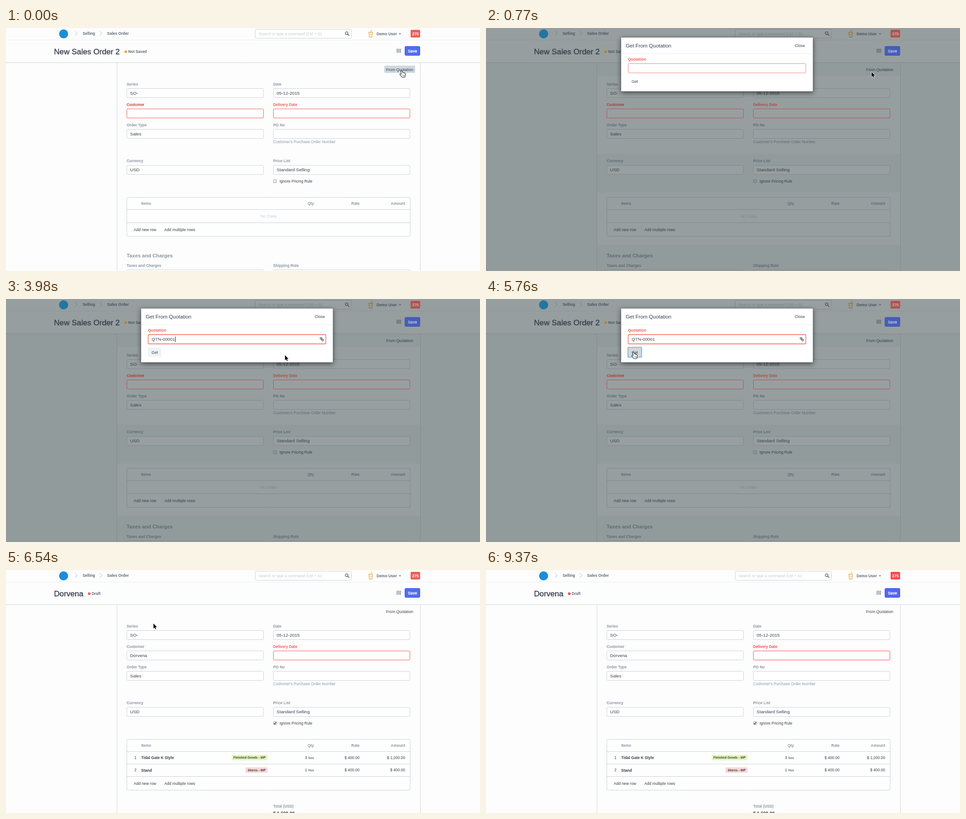
These frames come from a looping animation (1045 by 536 pixels, 9.51 s). An HTML page with a canvas:

```html
<!DOCTYPE html>
<html lang="en">
<head>
<meta charset="utf-8">
<title>Sales order from quotation</title>
<style>
html, body { margin: 0; width: 100%; height: 100%; overflow: hidden; background: #fdfdfd; }
canvas { display: block; width: 1045px; height: 536px; }
</style>
</head>
<body>
<canvas id="stage"></canvas>
<script>
const W = 1045, H = 536, LOOP = 9510;
const canvas = document.getElementById('stage');
const dpr = window.devicePixelRatio || 1;
canvas.width = W * dpr;
canvas.height = H * dpr;
const g = canvas.getContext('2d');

const FONT = '"Liberation Sans", Arial, sans-serif';
const INK = '#36414c', GREY = '#8a97a3', LINE = '#cbd3d8', SHADE = '#334143';
const CLIENT = 'Dorvena', ITEM = 'Tidal Gate K Style', QUOTE = 'QTN-00001';

const spread = (a, b, n) => Array.from({ length: n }, (_, i) => a + (b - a) * i / (n - 1));
const ticks = [0, 300, 460, 620, 770, 1020, 1160, 1310, 1460, 1750, 1900, 2040, 2340, 2490,
  ...spread(2790, 3380, 5), 3830, 3980, ...spread(4430, 5460, 8),
  5610, 5760, 5910, 6060, 6540, ...spread(7590, 8630, 8), 8780, 8920, 9370];

// Pointer path: time, x, y, shape
const path = [
  [0, 872, 95, 'hand'], [300, 872, 95, 'hand'], [460, 873, 98, 'hand'], [620, 873, 98, 'hand'],
  [770, 850, 97, 'arrow'], [1310, 630, 84, 'arrow'], [1460, 627, 88, 'beam'],
  [2640, 627, 88, 'arrow'], [3380, 615, 124, 'arrow'], [4290, 615, 124, 'arrow'],
  [5460, 325, 118, 'hand'], [5910, 325, 118, 'arrow'], [7440, 325, 118, 'arrow'],
  [8630, 1012, 521, 'arrow'], [8780, 1014, 523, 'arrow'], [8920, 0, 0, '']
];

const lerp = (a, b, k) => a + (b - a) * k;
const smooth = k => k * k * (3 - 2 * k);
const within = (t, a, b) => t >= a && t < b;

function text(s, x, yc, size = 8.5, color = INK, weight = '', align = 'left') {
  g.font = `${weight === 'bold' ? 'bold ' : ''}${size}px ${FONT}`;
  g.textAlign = align;
  g.fillStyle = color;
  const y = yc + size * 0.36;
  g.fillText(s, x, y);
  if (weight === 'medium') {
    g.strokeStyle = color;
    g.lineWidth = 0.4;
    g.strokeText(s, x, y);
  }
}
const bold = (s, x, yc, color = GREY, size = 8.4, align) => text(s, x, yc, size, color, 'bold', align);

function box(x, y, w, h, r, fill, stroke, lw = 1) {
  g.beginPath();
  g.roundRect(x, y, w, h, r);
  if (fill) { g.fillStyle = fill; g.fill(); }
  if (stroke) { g.strokeStyle = stroke; g.lineWidth = lw; g.stroke(); }
}

function line(points, color, lw = 1) {
  g.beginPath();
  points.forEach(([x, y], i) => i ? g.lineTo(x, y) : g.moveTo(x, y));
  g.strokeStyle = color;
  g.lineWidth = lw;
  g.stroke();
}

function disc(x, y, r, fill, stroke, lw = 1) {
  g.beginPath();
  g.arc(x, y, r, 0, 7);
  if (fill) { g.fillStyle = fill; g.fill(); }
  if (stroke) { g.strokeStyle = stroke; g.lineWidth = lw; g.stroke(); }
}

function field(label, x, y, value = '') {
  bold(label, x, y - 9.5);
  box(x + 0.5, y + 0.5, 301, 20, 2, '#fff', LINE);
  text(value, x + 7.5, y + 10, 9.95);
}

function needed(label, x, y, red) {
  bold(label, x, y - 9.5, red);
  box(x + 0.5, y + 0.5, 301, 20, 2, null, red);
}

// Coloured parts, which stay vivid under the backdrop
function accents(s) {
  const red = s.vivid ? '#fb4b50' : '#ee5f59';
  disc(127, 13, 10, '#1a8fd6');
  box(892, 4, 21, 17, 2, red);
  bold('275', 902.7, 12.8, '#fff', 8.5, 'center');
  box(879.5, 40.5, 33, 20, 2, s.vivid ? '#5365f6' : '#506df3', '#4559d8');
  text('Save', 896, 50.4, 8.8, '#fff', 'medium', 'center');
  if (s.filled) disc(183.5, 52.2, 3, red);
  else {
    disc(264, 52.2, 3, '#f5a638');
    needed('Customer', 266, 178, red);
  }
  needed('Delivery Date', 589, 178, red);
}

function navbar() {
  for (const x of [152, 206.5]) line([[x, 7], [x + 5, 12], [x, 17]], '#b4bcc2');
  bold('Selling', 169, 12, '#5f6b76', 8.4);
  bold('Sales Order', 223, 12, '#5f6b76', 8.5);
  box(549.5, 2.5, 212, 20, 2, '#fff', LINE);
  text('Search or type a command (Ctrl + G)', 557, 12.7, 8.5, '#c3cad0');
  disc(751, 11.3, 3, null, '#4b5560', 1.2);
  line([[753.2, 13.5], [756.8, 17]], '#4b5560', 1.6);
  const orange = '#efae45';
  line([[800, 10], [801.2, 20], [806.8, 20], [808, 10]], orange, 1.3);
  line([[799, 9.5], [809, 9.5]], orange, 1.6);
  line([[804, 9], [805.5, 5], [807.5, 4.5]], orange, 1.1);
  line([[800.8, 14], [807.2, 14]], orange);
  bold('Demo User', 817, 12.8, '#5f6b76', 8.5);
  g.beginPath();
  g.moveTo(866, 11.8); g.lineTo(871, 11.8); g.lineTo(868.5, 14.6);
  g.fillStyle = '#5f6b76';
  g.fill();
  line([[0, 26.5], [W, 26.5]], '#eaeef1');
}

function table(s) {
  const bottom = s.filled ? 485.5 : 459.5;
  box(266.5, 373.5, 624.5, bottom - 373.5, 2, '#fefefe', LINE);
  const rules = s.filled ? [400.5, 428, 455.5] : [400.5, 429.5];
  for (const y of rules) line([[266, y], [891, y]], LINE);
  bold('Items', 298, 386.7);
  [['Qty', 679], ['Rate', 779.5], ['Amount', 880]].forEach(([n, x]) => bold(n, x, 386.7, GREY, 8.4, 'right'));
  if (s.filled) {
    row(1, 413.7, ITEM, 'Finished Goods - WP', 498, '#e4f6b6', 3, '$ 1,200.00');
    row(2, 441.2, 'Stand', 'Stores - WP', 528, '#f8d7d4', 1, '$ 400.00');
  } else {
    text('No Data', 578.5, 414.5, 9.9, '#c9d0d5', '', 'center');
  }
  const y = bottom - 14.7;
  if (s.ghost) {
    box(277, y - 7.5, 59, 15, 2, '#eaeef6');
    box(346, y - 7.5, 76, 15, 2, '#eaeef6');
  }
  text('Add new row', 281.5, y, 8.6);
  text('Add multiple rows', 349, y, 8.65);
}

function row(n, y, name, store, x, tint, qty, sum) {
  text(n, 283, y, 8.5);
  bold(name, 298, y + 0.3, INK, 8.5);
  box(x, y - 6, 578 - x - 1.5, 12, 1.5, tint);
  bold(store, 572.5, y, INK, 7.1, 'right');
  text(qty, 659, y, 8.5);
  text('Nos', 679, y + 0.3, 7.2, INK, '', 'right');
  text('$ 400.00', 779.5, y, 8.5, INK, '', 'right');
  text(sum, 880, y, 8.5, INK, '', 'right');
}

function page(s) {
  g.fillStyle = '#fdfdfd';
  g.fillRect(0, 0, W, H);
  if (s.dim) {
    g.fillStyle = '#f4f7f8';
    g.fillRect(0, 77, 244, 459);
    g.fillRect(914, 77, 131, 459);
    for (const [y, h] of [[77, 29], [277, 86], [478, 58]]) g.fillRect(245, y, 668, h);
  }
  navbar();
  text(s.filled ? CLIENT : 'New Sales Order 2', 105.7, 52, 17.2, INK, 'medium');
  bold(s.filled ? 'Draft' : 'Not Saved', s.filled ? 189 : 269.5, 52.3, '#5f6b76', 8.4);
  g.fillStyle = '#85919c';
  for (let i = 0; i < 9; i++) g.fillRect(861 + i % 3 * 3.6, 46 + Math.floor(i / 3) * 3, 2.7, 2.1);
  line([[0, 76.5], [W, 76.5]], '#cfd5d9');
  for (const x of [244.5, 913.5]) line([[x, 77], [x, H]], '#cfd6da');

  if (s.hover) box(834, 83, 68, 16, 2, '#ced8df');
  text('From Quotation', 838, 91.5, 8.6);
  field('Series', 266, 133, 'SO-');
  field('Date', 589, 133, '05-12-2015');
  field('Customer', 266, 178, s.filled ? CLIENT : '');
  field('', 589, 178);
  field('Order Type', 266, 223, 'Sales');
  field('PO No', 589, 223);
  text("Customer's Purchase Order Number", 589, 251.3, 8.5, GREY);
  field('Currency', 266, 302.5, 'USD');
  field('Price List', 589, 302.5, 'Standard Selling');
  box(589.5, 334.5, 7, 7, 1.5, '#e6e8e9', '#a9afb3');
  if (s.filled) line([[591, 338], [592.7, 340], [595.5, 335.5]], '#30363c', 1.3);
  text('Ignore Pricing Rule', 603, 338, 8.5);
  table(s);
  if (s.filled) {
    bold('Total (USD)', 589, 521.3);
    bold('$ 1,600.00', 589, 537, INK, 10);
  } else {
    bold('Taxes and Charges', 266, 502.3, GREY, 11.2);
    field('Taxes and Charges', 266, 533);
    field('Shipping Rule', 589, 533);
  }
  accents(s);
}

function modal(s) {
  g.save();
  g.globalAlpha = s.alpha;
  g.translate(0, s.lift);
  g.shadowColor = 'rgba(0,0,0,.55)';
  g.shadowBlur = 11 * dpr;
  g.shadowOffsetY = 3 * dpr;
  box(297.5, 20.5, 423.5, 119.5, 1, '#fff');
  g.shadowColor = 'transparent';
  box(297.5, 20.5, 423.5, 119.5, 1, null, 'rgba(50,60,65,.55)');
  text('Get From Quotation', 308, 39.3, 11.4, INK);
  text('Close', 703, 39.3, 8.7, INK, '', 'right');
  line([[298, 56.5], [721, 56.5]], '#eaeef1');
  bold('Quotation', 313, 69, '#f2604f', 8.5);
  box(313.5, 78.5, 391.5, 20.5, 2, '#fff', s.focus ? '#f15f4e' : '#f2857a', s.focus ? 1.3 : 1);
  if (s.value) text(s.value, 321, 88.8, 9.9);
  if (s.caret) {
    const x = s.value ? 373.5 : 321.5;
    line([[x, 83], [x, 95]], '#222');
  }
  if (s.linked) {
    disc(694.4, 86.5, 2, null, INK, 1.1);
    disc(698, 90.2, 2, null, INK, 1.1);
    line([[695, 87.2], [697.4, 89.6]], INK, 1.1);
  }
  if (s.pressed) box(313, 106.5, 30, 22, 2, '#d2dae0', '#83bdec', 2.2);
  else if (s.value) box(313, 107, 29.5, 20.5, 2, '#eff3f6');
  text('Get', 321, 117.7, 8.7);
  if (s.list) dropdown();
  g.restore();
}

function dropdown() {
  g.shadowColor = 'rgba(0,0,0,.2)';
  g.shadowBlur = 8 * dpr;
  g.shadowOffsetY = 4 * dpr;
  box(313.5, 100, 391.5, 143, 2, '#fff');
  g.shadowColor = 'transparent';
  box(313.5, 100, 391.5, 143, 2, null, LINE);
  g.fillStyle = '#f0f4f7';
  g.fillRect(314, 101, 390.5, 28);
  [QUOTE, 'QTN-00002', 'QTN-00003', '+ Create a new Quotation', 'Advanced Search']
    .forEach((s, i) => text(s, 321, 115 + i * 28.4, 8.6));
}

function outline(points, fill, stroke, lw) {
  g.beginPath();
  points.forEach(([x, y]) => g.lineTo(x, y));
  g.closePath();
  g.lineJoin = 'round';
  g.strokeStyle = stroke;
  g.lineWidth = lw;
  g.stroke();
  g.fillStyle = fill;
  g.fill();
  g.lineJoin = 'miter';
}

const shapes = {
  arrow() {
    outline([[0, 0], [0, 11], [2.5, 8.7], [4.2, 12.6], [6, 11.8], [4.4, 8], [7.8, 8]], '#0a0a0a', '#fff', 1.5);
  },
  hand() {
    outline([[-1, 0.3], [0.2, -0.3], [1.4, 0.8], [2.2, 4], [3.6, 3.6], [4.6, 4.4], [6, 4.2], [6.7, 5.2],
      [7.8, 5.3], [8.3, 7], [7.6, 10], [7.2, 13], [1.4, 13.4], [-0.6, 10.6], [-3.4, 7.4], [-2.4, 6.2],
      [0.2, 7.8]], '#fff', '#111', 1.9);
    for (const x of [2.6, 4.4, 6.1]) line([[x, 8.6], [x + 0.1, 11]], '#333', 0.7);
  },
  beam() {
    line([[0, -4.5], [0, 4.5]], '#111', 1.2);
    for (const d of [-1, 1]) line([[-2.8, 6 * d], [-1, 5.6 * d], [0, 4.4 * d], [1, 5.6 * d], [2.8, 6 * d]], '#111');
  }
};

function pointer(t) {
  let i = path.length - 1;
  while (path[i][0] > t) i--;
  const [t0, x, y, shape] = path[i];
  if (!shape) return;
  const [t1, x1, y1, next] = path[i + 1];
  const k = next ? smooth((t - t0) / (t1 - t0)) : 0;
  g.save();
  g.translate(lerp(x, x1, k), lerp(y, y1, k));
  shapes[shape]();
  g.restore();
}

function stateAt(t) {
  const s = {
    hover: t < 770, ghost: within(t, 300, 770), filled: t >= 6540, vivid: t >= 9370,
    open: within(t, 460, 6060), dim: 0, lift: 0, alpha: 1,
    focus: t >= 1750, linked: t >= 1900, list: within(t, 2490, 3830),
    value: t >= 3830 ? QUOTE : '', pressed: t >= 5610,
    caret: within(t, 1750, 5610) && Math.floor(t / 500) % 2 === 1
  };
  if (within(t, 300, 6060)) s.dim = 0.5;
  if (t < 770) {
    s.dim = t < 300 ? 0 : lerp(0.2, 0.41, (t - 300) / 320);
    s.lift = t < 620 ? -32 : -13;
    s.alpha = t < 620 ? 0.5 : 1;
  } else if (t >= 5910 && s.open) {
    s.dim = 0.28;
    s.lift = -10;
    s.alpha = 0.5;
  }
  return s;
}

function draw(now) {
  const clock = now % LOOP;
  const t = ticks.filter(v => v <= clock).pop();
  const s = stateAt(t);
  g.setTransform(dpr, 0, 0, dpr, 0, 0);
  page(s);
  if (s.dim) {
    g.globalAlpha = s.dim;
    g.fillStyle = SHADE;
    g.fillRect(0, 0, W, H);
    g.globalAlpha = s.dim * 0.7;
    accents(s);
    g.globalAlpha = 1;
  }
  if (s.open) modal(s);
  pointer(t);
}

const start = performance.now();
function loop() {
  draw(performance.now() - start);
  requestAnimationFrame(loop);
}
loop();
</script>
</body>
</html>
```
